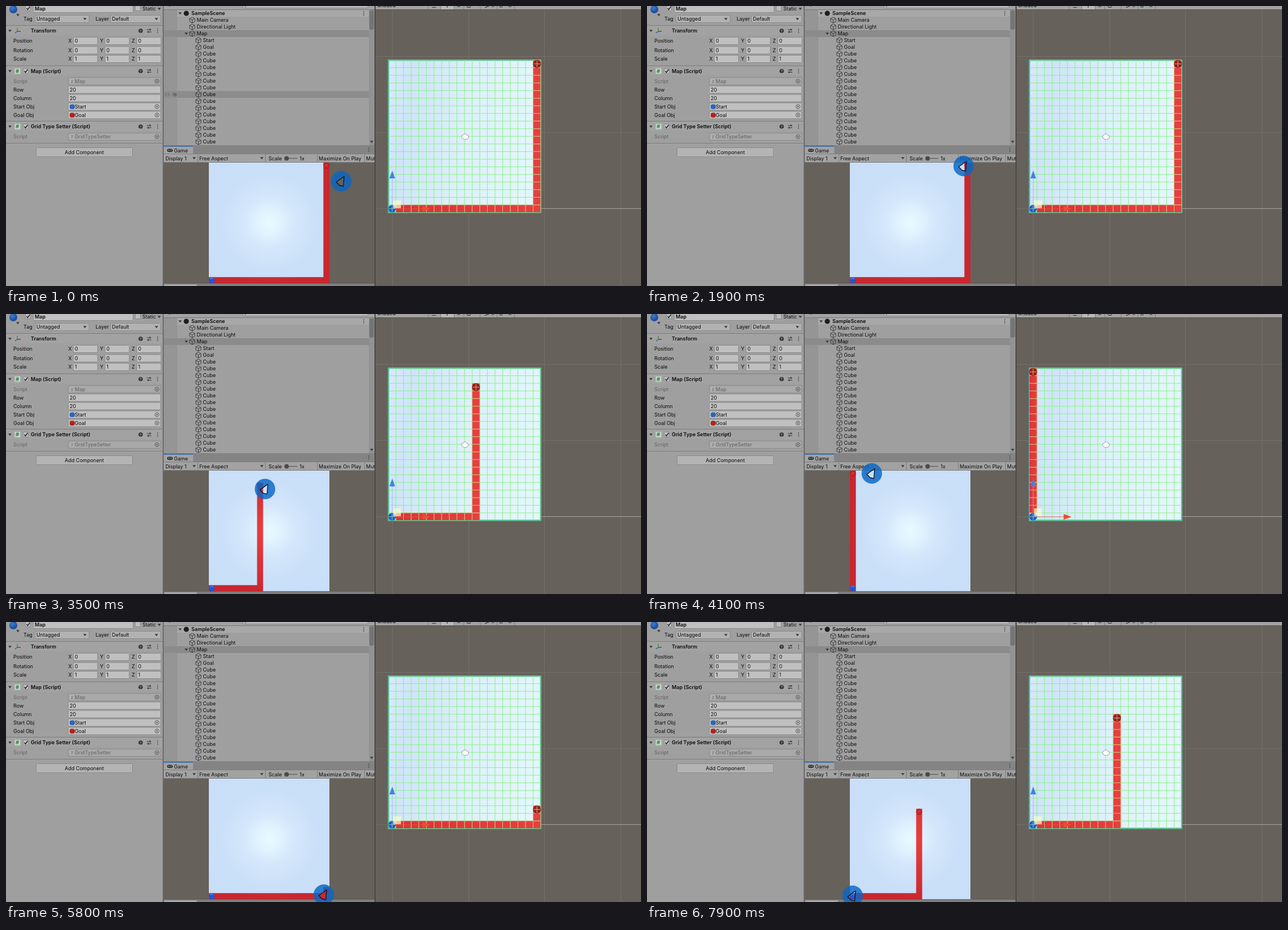
An HTML page for the animation above (8 s loop, 1127 by 497 pixels).

```html
<!DOCTYPE html>
<html lang="en">
<head>
<meta charset="utf-8">
<title>Path grid editor</title>
<style>
html, body { margin: 0; width: 100%; height: 100%; overflow: hidden; background: #a0a0a0; }
svg { display: block; width: 1127px; height: 497px; }
text { font: 9px Inter, "Liberation Sans", sans-serif; fill: #0b0b0b; white-space: pre; }
.b { font-weight: 600; }
.dim { fill: #626262; }
</style>
</head>
<body>
<svg id="stage" viewBox="0 0 1127 497" xmlns="http://www.w3.org/2000/svg">
<defs>
  <radialGradient id="sky" gradientUnits="userSpaceOnUse" cx="467" cy="385" r="150">
    <stop offset="0" stop-color="#e8faff"/><stop offset=".12" stop-color="#e1f4fe"/>
    <stop offset=".32" stop-color="#d3e6fb"/><stop offset=".6" stop-color="#cadff8"/>
    <stop offset="1" stop-color="#c9def7"/>
  </radialGradient>
  <radialGradient id="glowRed" gradientUnits="userSpaceOnUse" cx="467" cy="385" r="110">
    <stop offset="0" stop-color="#ec4040"/><stop offset="1" stop-color="#c9272f"/>
  </radialGradient>
  <linearGradient id="floor" x2="1" y2=".15">
    <stop offset="0" stop-color="#d6eafd"/><stop offset=".17" stop-color="#cfe4fb"/>
    <stop offset=".55" stop-color="#dcf0fd"/><stop offset="1" stop-color="#e3f6ff"/>
  </linearGradient>
  <linearGradient id="sceneRed"><stop offset="0" stop-color="#d93337"/><stop offset="1" stop-color="#e6403f"/></linearGradient>
  <radialGradient id="ball" cx=".4" cy=".35"><stop offset="0" stop-color="#3f7fd8"/><stop offset="1" stop-color="#1f4f9e"/></radialGradient>
  <clipPath id="tree"><rect x="280" y="0" width="374" height="247"/></clipPath>
  <clipPath id="gameClip"><rect x="280" y="247" width="374" height="250"/></clipPath>
</defs>
<g id="inspector"></g>
<g id="hierarchy" clip-path="url(#tree)"></g>
<g id="game" clip-path="url(#gameClip)"></g>
<g id="scene"></g>
<path id="cursorDisc" fill="#0967c6" fill-opacity=".82" fill-rule="evenodd"
  d="M-18.2 0a18.2 18.2 0 1 0 36.4 0a18.2 18.2 0 1 0 -36.4 0ZM5-8.5L3.7 9L-3 7.5L-9 1.5Z"/>
<path id="cursorArrow" fill="none" stroke="#101820" stroke-width="1.4" stroke-linejoin="round" d="M5-8.5L3.7 9L-3 7.5L-9 1.5Z"/>
</svg>
<script>
const $ = id => document.getElementById(id);
const rect = (x, y, w, h, fill, extra = '') => `<rect x="${x}" y="${y}" width="${w}" height="${h}" fill="${fill}" ${extra}/>`;
const text = (x, y, s, cls = '', extra = '') => `<text x="${x}" y="${y + 3.3}" class="${cls}" ${extra}>${s}</text>`;
const line = (d, stroke = '#333', w = 1, extra = '') => `<path d="${d}" fill="none" stroke="${stroke}" stroke-width="${w}" ${extra}/>`;
const fill = (d, color, extra = '') => `<path d="${d}" fill="${color}" ${extra}/>`;
const disc = (x, y, r, color, extra = '') => `<circle cx="${x}" cy="${y}" r="${r}" fill="${color}" ${extra}/>`;
const down = (x, y, color = '#3c3c3c') => fill(`M${x - 3} ${y - 1.7}h6l-3 4z`, color);
const dots = (x, y) => [-3, 0, 3].map(d => rect(x - .7, y + d - .7, 1.4, 1.4, '#333')).join('');
const boxed = (x, y, w, h, color) => rect(x + .5, y + .5, w, h, color, 'stroke="#8a8a8a" rx="1.5"');
const check = (x, y, on = true) => boxed(x - 5, y - 5, 9, 9, '#bdbdbd') +
  (on ? line(`M${x - 2.5} ${y}l2 2.5l4-5.5`, '#222', 1.4) : '');
const cube = (x, y) => line(`M${x} ${y - 5}l4.6 2.4v5.2l-4.6 2.4l-4.6-2.4v-5.2zM${x - 4.6} ${y - 2.6}l4.6 2.4l4.6-2.4M${x}${' '}${y}v5`, '#333', .9);

// ---------- Inspector ----------
function headerRow(y, title) {
  return rect(0, y - 9, 278, 17, '#a2a2a2') + line(`M0 ${y - 9.5}h278`, '#7c7c7c') + down(7, y) +
    text(44, y, title, 'b') + disc(239, y, 3.8, '#333') +
    text(237, y + .2, '?', 'b', 'style="fill:#a2a2a2;font-size:7px"') +
    line(`M250 ${y - 2}h8M250 ${y + 2}h8M255.5 ${y - 4}v4M252.5 ${y}v4`) + dots(269, y);
}
const scriptBadge = y => rect(15.5, y - 5, 10, 10, '#c2d2c4') + text(17.2, y, '#', 'b', 'style="fill:#18753a"') + check(35, y);
const combo = (x, y, w, s) => boxed(x, y - 7, w, 13, '#b2b2b2') + text(x + 3, y, s) + down(x + w - 7, y);

function inspector() {
  let s = rect(0, 0, 278, 497, '#9f9f9f');
  s += disc(13, 6, 7, 'url(#ball)') + down(21, 16) + check(39, 4);
  s += boxed(48, -4, 177, 15, '#c0c0c0') + text(51, 5, 'Map', 'b') + check(234, 4, false) + text(242, 5, 'Static') + down(272, 5);
  s += text(31, 23, 'Tag') + combo(51, 23, 96, 'Untagged') + text(159, 23, 'Layer') + combo(185, 23, 89, 'Default');
  s += headerRow(44, 'Transform') + line('M20 39v6h6', '#3d8f3d', 1.4) + line('M20 45l-4 3', '#2c5fb8', 1.4) + line('M20 45h6', '#b33', 1.4);
  ['Position', 'Rotation', 'Scale'].forEach((name, i) => {
    const y = [62, 78.5, 94][i];
    s += text(13, y, name);
    ['X', 'Y', 'Z'].forEach((axis, k) => {
      const x = 119 + k * 56.3;
      s += text(x - 8.5, y, axis) + boxed(x, y - 7, 43, 13, '#c0c0c0') + text(x + 3, y, i < 2 ? 0 : 1);
    });
  });
  const field = (y, name, value, kind) => {
    const off = kind === 'script', ball = kind && !off;
    s += text(13, y, name, off ? 'dim' : '') + boxed(110, y - 7, 164, 13, off ? '#a9a9a9' : '#c0c0c0');
    if (ball) s += rect(113, y - 4, 9, 8.5, kind, 'rx="3.5"');
    if (off) s += rect(114, y - 3.5, 6, 7, '#b4bdb5') + text(115, y, '#', 'dim', 'style="font-size:7px"');
    s += text(kind ? 122 : 113, y, value, off ? 'dim' : '');
    if (kind) s += disc(268, y, 3.6, 'none', 'stroke="#555"') + disc(268, y, 1.3, '#555');
  };
  s += headerRow(115.5, 'Map (Script)') + scriptBadge(115.5);
  field(133.5, 'Script', 'Map', 'script');
  field(148.5, 'Row', '20');
  field(163.5, 'Column', '20');
  field(178.5, 'Start Obj', 'Start', '#2d66bb');
  field(193.5, 'Goal Obj', 'Goal', '#b3231d');
  s += headerRow(214, 'Grid Type Setter (Script)') + scriptBadge(214);
  field(232, 'Script', 'GridTypeSetter', 'script');
  s += line('M0 243.5h278', '#7c7c7c') + boxed(53, 251, 171, 16, '#b4b4b4') + text(139, 260, 'Add Component', '', 'text-anchor="middle"');
  return s + rect(278, 0, 2, 497, '#6b6b6b');
}

// ---------- Hierarchy ----------
const rowNames = ['SampleScene', 'Main Camera', 'Directional Light', 'Map', 'Start', 'Goal', ...Array(14).fill('Cube')];
function hierarchy() {
  let s = rect(280, 0, 374, 247, '#9f9f9f') + rect(280, 7, 24, 240, '#959595');
  s += rect(304, 7, 340, 12, '#a8a8a8') + rect(280, 43, 364, 12, '#8b8b8b');
  s += `<g id="hover">${rect(280, -6, 364, 12, '#8c8c8c')}${fill('M282 0q4.500-5 9 0q-4.500 5-9 0z', '#727272')}${disc(286.5, 0, 1.5, '#9a9a9a')}${fill('M295-4l2 2l3-1l3 1v4l-3 2l-3-2z', '#6d6d6d')}</g>`;
  rowNames.forEach((name, i) => {
    const y = 13 + 12 * i, x = i === 0 ? 320 : i < 4 ? 330.5 : 341.5;
    s += i ? cube(x, y) : disc(x, y, 4.6, '#1e1e1e');
    s += text(i ? x + 8 : 329, y, name, i ? '' : 'b');
    if (i === 0 || i === 3) s += down(i ? 320 : 309, y);
  });
  s += dots(635, 13) + rect(280, 0, 374, 6, '#a2a2a2') + line('M280 6.5h374', '#777');
  s += line('M289 0h3', '#333') + boxed(420, -8, 222, 11, '#b8b8b8') + line('M424 0l2 2', '#444');
  s += rect(644, 7, 10, 240, '#929292') + rect(645, 8, 8, 34, '#747474', 'rx="3"') + down(649, 241);
  return s;
}

// ---------- Game view ----------
const gameGrid = { x: 360, y: 278, size: 10.7 };
const sceneGrid = { x: 678.5, y: 96, size: 13.53 };
const centre = (g, c, r) => [g.x + (c + .5) * g.size, g.y + (r + .5) * g.size];

function game() {
  let s = rect(280, 247, 374, 250, '#66615a') + rect(280, 247, 374, 16, '#848484') + rect(280, 248, 52, 15, '#a2a2a2') + rect(280, 248, 52, 1.5, '#2b62a8');
  s += rect(286, 253.500, 10, 5.500, '#333', 'rx="2.7"') + disc(289, 256, 1, '#a2a2a2') + disc(293, 256, 1, '#a2a2a2') + text(298, 256.5, 'Game') + dots(644, 255);
  s += rect(280, 263, 374, 15, '#a2a2a2') + line('M280 262.5h374M280 277.500h374', '#7d7d7d');
  s += line('M340.5 263v15M460.5 263v15M552.5 263v15M636.5 263v15', '#7d7d7d');
  s += text(283, 270.5, 'Display 1') + down(334, 270) + text(343, 270.5, 'Free Aspect') + down(454, 270) + text(466, 270.5, 'Scale');
  s += line('M496 270.500h21', '#5e5e5e', 1.3) + disc(498, 270.500, 4, '#4a4a4a') + text(521, 270.5, '1x') + text(555, 270.5, 'Maximize On Play') + text(639, 270.5, 'Mute Audio');
  s += rect(360, 278, 214, 214, 'url(#sky)') + '<path id="gamePath" fill="url(#glowRed)"/>';
  s += disc(365.3, 487, 5.2, '#1e56d2') + line('M362 485q3-4 6 0', '#4d84ea', 1.3);
  s += `<g id="gameGoal">${disc(0, 0, 4.8, '#cb252b', 'stroke="#a3171f" stroke-width="1"')}${line('M-2.5 1l4-3', '#e04a48', 1.2)}</g>`;
  return s + rect(280, 493, 374, 4, '#7f7f7f') + rect(281, 494, 58, 3, '#a8a8a8', 'rx="1"');
}

// ---------- Scene view ----------
function scene() {
  const { x, y, size } = sceneGrid, span = size * 20;
  let s = rect(654, 0, 473, 497, '#66615a') + rect(654, 0, 2, 497, '#4b4845');
  s += line('M685.5 7v490M821.5 7v490M955.5 7v490M1091.5 7v490M656 89.5h471M656 224.5h471M656 360h22', '#75716b');
  s += line('M949 359.5h178', '#a9a8a3');
  s += rect(656, 0, 471, 6, '#a2a2a2') + line('M656 6.500h471', '#55514d') + text(659, -1.5, 'Shaded');
  s += line('M749.5 0v6M771.5 0v6M795.500 0v6M812.5 0v6M841.5 0v6M871.500 0v6M902.5 0v6', '#7d7d7d') + rect(772, 0, 23, 6, '#b8b8b8');
  s += line('M756 2.500h7M783 0v3M801 1h5M818 1q3 3 7 0M850 3l9-4M862 1h4M877 0v3M880 0v3M892 1h5', '#333', 1.2);
  s += rect(x, y, span, span, 'url(#floor)', 'stroke="#438994" stroke-width="2.5"');
  let grid = '';
  for (let i = 0; i <= 20; i++) grid += `M${x + i * size} ${y}v${span}M${x} ${y + i * size}h${span}`;
  s += line(grid, '#8cf07e', 1) + '<path id="scenePath" fill="url(#sceneRed)" stroke="#d9bd85" stroke-width=".8"/>';
  s += rect(x, y, span, span, 'none', 'stroke="#62cd88"');
  const cross = line('M-6 0H6M0-6V6', '#9ed79a', .9);
  s += `<g transform="translate(685.3 359.8)">${disc(0, 0, 6.8, '#1f58d3')}${cross}</g>`;
  s += `<g id="sceneGoal">${disc(0, 0, 6.6, '#a51c1d', 'stroke="#7a2019"')}${cross}</g>`;
  s += line('M685.5 306v46', '#94b9ee', .8) + fill('M685.500 292l5 14h-10z', '#3f83e4');
  s += rect(687, 345, 14, 14, '#f8fbc8', 'fill-opacity=".72"');
  s += line('M692 360h48', '#e25a3c', .9) + fill('M739.500 355l14 5l-14 5z', '#ef4c32');
  s += fill('M808.500 232q0-3 3-3q1-3 4-2q3 1 3 3q3 0 2.500 3q-2 4-6 4q-5 0-6.500-5z', '#fbfcfd', 'stroke="#8d969c" stroke-width=".9"');
  return s;
}

$('inspector').innerHTML = inspector();
$('hierarchy').innerHTML = hierarchy();
$('game').innerHTML = game();
$('scene').innerHTML = scene();

// ---------- Motion: ten steps a second, with pauses between bursts ----------
const bursts = [[200, 1000], [1100, 1900], [2200, 2500], [3400, 3900], [4100, 4500], [4700, 5100],
  [5300, 5800], [6100, 6400], [6600, 6700], [6900, 7200], [7400, 7600], [7800, 7900]];
const cursorKeys = [[0, 595, 311], [1, 590, 303], [4, 545, 225], [9, 440, 111], [10, 452, 202], [11, 493, 388],
  [13, 512, 368], [18, 562, 284], [19, 560, 286], [20, 548, 300], [21, 524, 318], [22, 509, 320], [25, 435, 306],
  [28, 357, 288], [29, 399, 283], [31, 378, 291], [33, 388, 296], [34, 402, 302], [36, 472, 317], [37, 553, 314],
  [38, 562, 320], [41, 556, 405], [43, 562, 473], [44, 564, 484], [45, 562, 472], [48, 547, 418], [49, 512, 394],
  [50, 495, 387], [51, 486, 352], [52, 478, 341], [54, 365, 468], [56, 352, 480], [57, 359, 486], [59, 365, 486]];
const goalKeys = [[0, 19, 0], [19, 19, 0], [20, 18, 1], [21, 15, 3], [22, 14, 3], [27, 0, 0], [31, 0, 0], [32, 1, 0],
  [33, 1, 0], [34, 3, 1], [35, 8, 2], [36, 8, 2], [37, 19, 2], [38, 19, 3], [43, 19, 17], [44, 19, 18], [45, 19, 18],
  [47, 18, 12], [48, 18, 12], [49, 13, 9], [50, 13, 9], [51, 12, 6], [52, 11, 5]];

function stepAt(ms) {
  return bursts.reduce((n, [from, to]) => ms < from ? n : n + Math.floor((Math.min(ms, to) - from) / 100) + 1, 0);
}
function sample(keys, step) {
  const i = keys.findIndex(k => k[0] >= step);
  if (i < 0) return keys[keys.length - 1].slice(1);
  if (i === 0) return keys[0].slice(1);
  const a = keys[i - 1], b = keys[i], u = (step - a[0]) / (b[0] - a[0]);
  return [1, 2].map(k => a[k] + (b[k] - a[k]) * u);
}
const goalAt = step => sample(goalKeys, Math.max(0, step)).map(Math.round);

// The hovered row stays lit after the pointer leaves the list, until the drag begins.
function hoverAt(step) {
  if (step > 16) return -100;
  let y = 157;
  for (let i = 1; i <= step; i++) {
    const tip = sample(cursorKeys, i)[1] - 9;
    if (tip < 247) y = 13 + 12 * Math.round((tip - 13) / 12);
  }
  return y;
}

function cellPath({ x, y, size }, [col, row]) {
  const cell = (c, r) => `M${x + c * size} ${y + r * size}h${size}v${size}h${-size}z`;
  let d = '';
  for (let c = 1; c <= col; c++) d += cell(c, 19);
  for (let r = 18; r >= row; r--) d += cell(col, r);
  return d;
}
function barPath({ x, y, size }, [col, row]) {
  const bottom = y + 20 * size, left = x + col * size, top = y + row * size;
  return `M${x} ${bottom - size}H${left + size}V${bottom}H${x}zM${left} ${top}h${size}V${bottom}h${-size}z`;
}
const move = (id, x, y) => $(id).setAttribute('transform', `translate(${x} ${y})`);

let shown = -1;
function draw(ms) {
  const step = stepAt(ms);
  if (step === shown) return;
  shown = step;
  const cursor = sample(cursorKeys, step), goal = goalAt(step), late = goalAt(step - 1);
  move('cursorDisc', ...cursor);
  move('cursorArrow', ...cursor);
  move('hover', 0, hoverAt(step));
  $('gamePath').setAttribute('d', barPath(gameGrid, goal));
  $('scenePath').setAttribute('d', cellPath(sceneGrid, late));
  move('gameGoal', ...centre(gameGrid, ...goal));
  move('sceneGoal', ...centre(sceneGrid, ...late));
}
const begin = performance.now();
function tick() {
  draw((performance.now() - begin) % 8000);
  requestAnimationFrame(tick);
}
tick();
</script>
</body>
</html>
```
